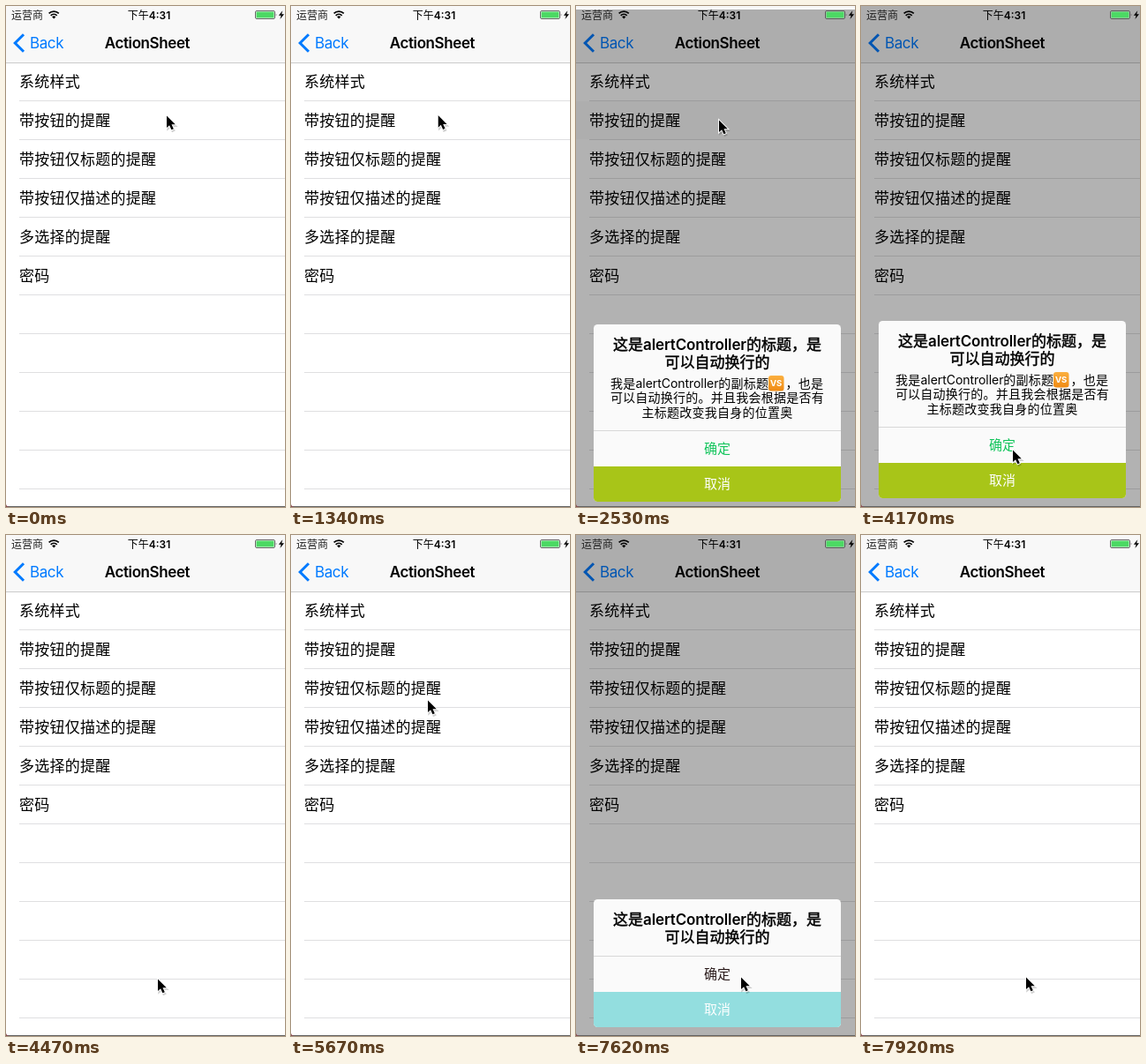
An HTML page that plays this animation: 316x568 px, repeating every 8 s.

```html
<!DOCTYPE html>
<html lang="zh-CN">
<head>
<meta charset="utf-8">
<title>ActionSheet</title>
<style>
html, body { margin: 0; width: 100%; height: 100%; overflow: hidden; background: #fff; }
svg { display: block; width: 316px; height: 568px; }
text { font-family: Inter, "Noto Sans CJK SC", sans-serif; white-space: pre; }
.row { font-size: 17px; letter-spacing: .25px; }
.nav { font-size: 17px; letter-spacing: -.4px; }
.head { font-size: 17px; stroke: #000; stroke-width: .45px; }
.head tspan { font-weight: 600; letter-spacing: -.15px; stroke: none; }
.body { font-size: 14px; letter-spacing: .25px; }
.body tspan { letter-spacing: -.05px; }
.btn { font-size: 15px; }
.mid { text-anchor: middle; }
.status { font-size: 12px; }
</style>
</head>
<body>
<svg viewBox="0 0 316 568" xmlns="http://www.w3.org/2000/svg">
  <defs>
    <linearGradient id="badge" x2="0" y2="1">
      <stop offset="0" stop-color="#fbb040"/>
      <stop offset="1" stop-color="#f08a12"/>
    </linearGradient>
    <path id="arrow" d="M1 .5v13.6l3.1-2.9 2.3 5.1 2.4-1.1-2.3-4.9h4.3z"/>
  </defs>
  <rect width="316" height="568" fill="#fff"/>
  <rect id="press" width="316" height="43" fill="#d9d9d9"/>
  <g id="list"></g>

  <rect width="316" height="64" fill="#f8f8f8"/>
  <rect y="64" width="316" height="1" fill="#cbcbcb"/>
  <path d="M20 32.2L10.2 42l9.8 9.8" fill="none" stroke="#007aff" stroke-width="3"/>
  <text class="nav" x="27" y="48" fill="#007aff">Back</text>
  <text class="nav mid" x="160" y="48" font-weight="600">ActionSheet</text>

  <g id="overlay">
    <rect width="316" height="568" fill="#000" fill-opacity=".3"/>
    <g id="sheets"></g>
  </g>

  <g id="status">
    <text class="status" x="6" y="14.5" fill="#222">运营商</text>
    <path d="M48.6 8.4a8 8 0 0 1 11.2 0M50.7 10.9a5 5 0 0 1 7 0" fill="none" stroke="#000" stroke-width="1.7"/>
    <path d="M52.1 12.3a3 3 0 0 1 4.2 0L54.2 14.5z"/>
    <text class="status mid" x="162" y="14.5" font-weight="500">下午<tspan font-weight="600">4:31</tspan></text>
    <rect x="282.5" y="5.5" width="22" height="9" rx="1.5" fill="#fff" fill-opacity=".3" stroke="#444" stroke-width=".8"/>
    <rect x="283.5" y="6.5" width="20" height="7" rx=".6" fill="#4cd964"/>
    <path d="M305.8 8.5q1.4 1.5 0 3z" fill="#444"/>
    <path d="M313.3 5.2L308.8 10.8H311.6L310.4 14.9L315 9.3H312.2z"/>
  </g>

  <rect y="567" width="316" height="1" fill="#636363"/>
  <path d="M0 564.5Q.3 567.5 4 568H0z" fill="#8a4a50"/>
  <g id="cursor">
    <use href="#arrow" x="1" y="2" opacity=".18" stroke="#000" stroke-width="1.5"/>
    <use href="#arrow" stroke="#fff" stroke-width="1.8" paint-order="stroke"/>
  </g>
</svg>
<script>
const $ = id => document.getElementById(id);
const LOOP = 8000, BEAT = 150, ROW = 44;
const rowTop = i => 64 + ROW * i;

const names = ['系统样式', '带按钮的提醒', '带按钮仅标题的提醒', '带按钮仅描述的提醒', '多选择的提醒', '密码'];

const label = (cls, x, y, s, fill = '#000') =>
  `<text class="${cls}" x="${x}" y="${y}" fill="${fill}">${s}</text>`;

let list = '';
for (let i = 0; i < 11; i++) {
  list += label('row', 15, rowTop(i) + 28, names[i] || '') +
    `<rect x="15" y="${rowTop(i) + 43}" width="301" height="1" fill="#dfdfe1"/>`;
}
$('list').innerHTML = list;

const details =
  label('body', 39, 429, '我是<tspan>alertController</tspan>的副标题') +
  '<rect x="218" y="415" width="17.5" height="17.5" rx="3" fill="url(#badge)"/>' +
  '<text x="226.7" y="427.3" class="mid" font-size="9.5" font-weight="700" fill="#fff">VS</text>' +
  label('body', 237.5, 429, '，也是') +
  label('body mid', 160, 445.3, '可以自动换行的。并且我会根据是否有') +
  label('body mid', 160, 461.7, '主标题改变我自身的位置奥');

function sheet(top, okColor, cancelColor, extra) {
  return `<g><rect x="20" y="${top}" width="280" height="${558 - top}" rx="4.5" fill="#fafafa"/>` +
    '<rect x="20" y="477" width="280" height="1" fill="#d8d8d8"/>' +
    `<path d="M20 518H300V553.5a4.5 4.5 0 0 1-4.5 4.5H24.5a4.5 4.5 0 0 1-4.5-4.5z" fill="${cancelColor}"/>` +
    label('head mid', 160, top + 29, '这是<tspan>alertController</tspan>的标题，是') +
    label('head mid', 160, top + 49, '可以自动换行的') + extra +
    label('btn mid', 160, 503, '确定', okColor) +
    label('btn mid', 160, 543.3, '取消', '#fff') + '</g>';
}
$('sheets').innerHTML =
  sheet(357, '#10c45a', '#a8c518', details) +
  sheet(413, '#2a1a1a', '#93dedf', '');

const shows = [
  { from: 15, until: 30, row: 1 },
  { from: 42, until: 53, row: 2 }
];

// each move eases to x, y between two beats; bend bows it up or down
const move = (from, until, x, y, bend = 0) => ({ from, until, x, y, bend });
const moves = [
  move(3, 6, 177, 127),
  move(8, 11, 161, 129, -6),
  move(18, 22, 197, 515),
  move(22, 28, 171, 503, 18),
  move(31, 34, 138, 188),
  move(35, 38, 154, 187),
  move(38, 40, 157, 181),
  move(44, 48, 212, 510),
  move(48, 51, 186, 501, 40)
];

function pointer(n) {
  let x = 181, y = 124;
  for (const m of moves) {
    const k = Math.min(1, Math.max(0, (n - m.from) / (m.until - m.from)));
    const e = 1 - (1 - k) ** 3;
    x += (m.x - x) * e;
    y += (m.y - y) * e + m.bend * Math.sin(Math.PI * e);
  }
  return [x, y];
}

function draw(t) {
  const n = Math.floor((t + Math.min(30, t / 80)) / BEAT);
  const at = shows.findIndex(s => n >= s.from && n < s.until);
  const display = at < 0 ? 'none' : '';
  $('overlay').style.display = display;
  $('press').style.display = display;
  if (at >= 0) {
    const { from, row } = shows[at];
    const w = 17 * ((n - from) * .147 + .12);
    const drop = Math.round(568 * Math.exp(-w) * (1 + w));
    $('overlay').setAttribute('transform', `translate(0 ${drop})`);
    [...$('sheets').children].forEach((g, i) => g.style.display = i === at ? '' : 'none');
    $('press').setAttribute('y', rowTop(row));
    $('press').setAttribute('opacity', Math.max(0, 1 - (n - from) / 2.4));
  }
  $('cursor').setAttribute('transform', `translate(${pointer(n)})`);
}

function tick(now) {
  draw(now % LOOP);
  requestAnimationFrame(tick);
}
draw(0);
requestAnimationFrame(tick);
</script>
</body>
</html>
```
